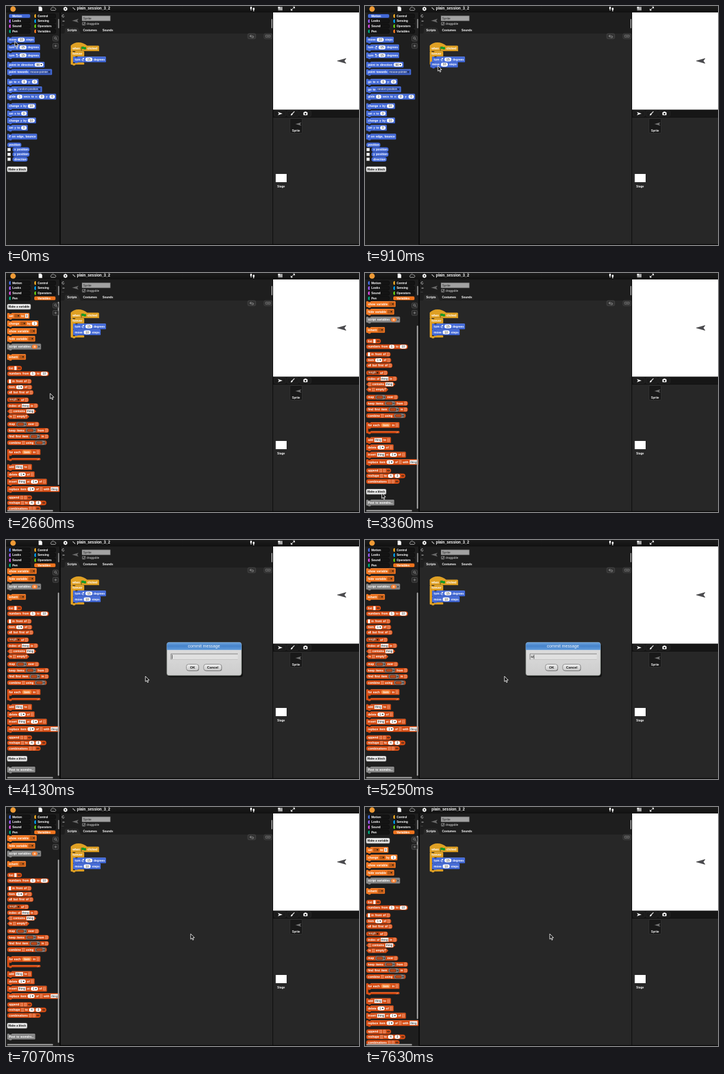
Recreate the animation shown at these times as an HTML page with a canvas. Size 600x407 px, loop 7.7 s.

```html
<!DOCTYPE html>
<html lang="en">
<head>
<meta charset="utf-8">
<title>Block editor</title>
<style>
html, body { margin: 0; width: 100%; height: 100%; overflow: hidden; background: #0a0a0a; }
canvas { display: block; width: 600px; height: 407px; }
</style>
</head>
<body>
<canvas id="stage"></canvas>
<script>
const LOOP = 7700;
const canvas = document.getElementById('stage');
const g = canvas.getContext('2d');
const ratio = window.devicePixelRatio || 1;
canvas.width = 600 * ratio;
canvas.height = 407 * ratio;

const BLUE = '#4369d6', GOLD = '#dfa024', ORANGE = '#ee741f', RED = '#d54d14', GRAY = '#868686';
const LABEL = 4.95;
const PROJECT = 'plain_session_3_2';

const CATEGORIES = [
  ['Motion', BLUE], ['Control', GOLD], ['Looks', '#8f56e3'], ['Sensing', '#0494dc'],
  ['Sound', '#cf4ad9'], ['Operators', '#62c213'], ['Pen', '#00a178'], ['Variables', ORANGE]
];

// Block notation: (n) oval slot, [s] text slot, {s} menu slot, |a| variable,
// # list, @ ring, ~ arrows, > arrow, % and & turn icons, $ flag; trailing "v" adds a menu mark.
const MOTION = [
  ['cmd', 57.5, 'move (10) steps'], ['cmd', 70.5, 'turn % (15) degrees'], ['cmd', 84, 'turn & (15) degrees'],
  ['cmd', 100, 'point in direction (90v)'], ['cmd', 112.5, 'point towards {mouse-pointer}'],
  ['cmd', 129, 'go to x: (0) y: (0)'], ['cmd', 142, 'go to {random position}'],
  ['cmd', 154.5, 'glide (1) secs to x: (0) y: (0)'], ['cmd', 170.5, 'change x by (10)'],
  ['cmd', 183, 'set x to (0)'], ['cmd', 195, 'change y by (10)'], ['cmd', 207.5, 'set y to (0)'],
  ['cmd', 222.5, 'if on edge, bounce'], ['pill', 236.5, 'position'],
  ['check', 244.5, 'x position'], ['check', 252.7, 'y position'], ['check', 261, 'direction'],
  ['button', 278, 'Make a block', 34]
];
const VARIABLES = [
  ['button', 57.5, 'Make a variable', 40],
  ['cmd', 73, 'set {} to [0]', ORANGE], ['cmd', 86, 'change {} by (1)', ORANGE],
  ['cmd', 99, 'show variable {}', ORANGE], ['cmd', 112, 'hide variable {}', ORANGE],
  ['cmd', 125.5, 'script variables |a| >', GRAY], ['cmd', 143, 'inherit {}', ORANGE],
  ['pill', 162, 'list [] ~'], ['pill', 171.5, 'numbers from (1) to (10)'],
  ['pill', 184.5, '[] in front of #'], ['pill', 194.5, 'item (1v) of #'], ['pill', 203.5, 'all but first of #'],
  ['pill', 216, '{length} of #'], ['pill', 226, 'index of [thing] in #'],
  ['hex', 235.5, '# contains [thing]'], ['hex', 244.5, 'is # empty?'],
  ['pill', 257.5, 'map @ over #'], ['pill', 268, 'keep items @ from #'],
  ['pill', 278.5, 'find first item @ in #'], ['pill', 289, 'combine # using @'],
  ['loop', 305, 'for each |item| in #'],
  ['cmd', 330.5, 'add [thing] to #'], ['cmd', 343, 'delete (1v) of #'],
  ['cmd', 355.5, 'insert [thing] at (1v) of #'], ['cmd', 368, 'replace item (1v) of # with [thing]'],
  ['pill', 382.5, 'append # # ~'], ['pill', 391.5, 'reshape # to (4) (3) ~'], ['pill', 401, 'combinations # # ~'],
  ['button', 418.5, 'Make a block', 34], ['cmd', 437, 'Post to womdra...', GRAY]
];

const POINTER = [
  [0, 15, 60], [280, 15, 60], [980, 127, 103], [1260, 127, 103], [1820, 72, 48], [2030, 66, 42],
  [2170, 66, 42], [2660, 75, 205], [3010, 75, 205], [3430, 25, 388], [3570, 25, 388],
  [4060, 237, 232], [5950, 237, 232], [6440, 310, 215], [6790, 310, 215], [7100, 314, 216]
];
const DRAG_START = 280, DROP = 1120, SHOW_VARIABLES = 2100, ASK = 3640, CONFIRM = 6790, SAVED = 7210;

const clamp = v => Math.max(0, Math.min(1, v));
const ease = v => v * v * (3 - 2 * v);
const ramp = (t, from, to) => ease(clamp((t - from) / (to - from)));

function pointerAt(t) {
  const next = POINTER.findIndex(k => k[0] > t);
  if (next < 0) return POINTER.at(-1).slice(1);
  const [a, b] = [POINTER[next - 1], POINTER[next]];
  const k = ramp(t, a[0], b[0]);
  return [a[1] + (b[1] - a[1]) * k, a[2] + (b[2] - a[2]) * k];
}

function rect(x, y, w, h, fill) {
  g.fillStyle = fill;
  g.fillRect(x, y, w, h);
}
function round(x, y, w, h, r, fill, stroke, line = 0.6) {
  g.beginPath();
  g.roundRect(x, y, w, h, r);
  if (fill) { g.fillStyle = fill; g.fill(); }
  if (stroke) { g.strokeStyle = stroke; g.lineWidth = line; g.stroke(); }
}
function poly(points, fill, stroke, line = 0.6) {
  g.beginPath();
  points.forEach(([x, y]) => g.lineTo(x, y));
  g.closePath();
  if (fill) { g.fillStyle = fill; g.fill(); }
  if (stroke) { g.strokeStyle = stroke; g.lineWidth = line; g.stroke(); }
}
function circle(x, y, r, fill) {
  g.beginPath();
  g.arc(x, y, r, 0, 7);
  g.fillStyle = fill;
  g.fill();
}
function stroke(path, color, width) {
  g.strokeStyle = color;
  g.lineWidth = width;
  g.stroke(new Path2D(path));
}
const fill = (path, color) => { g.fillStyle = color; g.fill(new Path2D(path)); };
const setFont = (size, bold) => { g.font = `${bold ? 'bold ' : ''}${size}px "Liberation Sans", Arial, sans-serif`; };
function widthOf(str, size = LABEL, bold = true) {
  setFont(size, bold);
  return g.measureText(str).width;
}
function text(str, x, y, size = LABEL, color = '#fff', bold = true, align = 'left') {
  setFont(size, bold);
  g.textAlign = align;
  g.textBaseline = 'middle';
  g.fillStyle = color;
  g.fillText(str, x, y + 0.2);
}
function gradient(y1, y2, ...colors) {
  const grad = g.createLinearGradient(0, y1, 0, y2);
  colors.forEach((c, i) => grad.addColorStop(i / (colors.length - 1), c));
  return grad;
}
const menuMark = (x, y, color) => poly([[x, y - 1], [x + 3, y - 1], [x + 1.5, y + 1.3]], color);
const arrowRight = (x, y) => poly([[x, y - 1.7], [x + 2, y], [x, y + 1.7]], '#222');

// Draws one part of a block label and returns its width.
function part(token, x, y, paint) {
  const kind = token[0], body = token.slice(1, -1);
  if (kind === '(') {
    const menu = body.endsWith('v'), label = menu ? body.slice(0, -1) : body;
    const w = widthOf(label, LABEL, false) + 6.4 + (menu ? 3 : 0);
    if (paint) {
      round(x, y - 3.3, w, 6.6, 3.3, '#fff');
      text(label, x + 3.2, y, LABEL, '#111', false);
      if (menu) menuMark(x + w - 5, y, '#111');
    }
    return w;
  }
  if (kind === '[') {
    const w = Math.max(3.6, widthOf(body, LABEL, false) + 2.4);
    if (paint) {
      rect(x, y - 3.2, w, 6.4, '#fff');
      text(body, x + 1.2, y, LABEL, '#111', false);
    }
    return w;
  }
  if (kind === '{') {
    const label = widthOf(body, 4.7, false), w = label + (body ? 6 : 9.5);
    if (paint) {
      rect(x, y - 3.2, w, 6.4, 'rgba(0,0,0,.24)');
      text(body, x + 1, y, 4.7, '#eee', false);
      menuMark(x + w - 4.2, y, '#111');
    }
    return w;
  }
  if (kind === '|') {
    const w = widthOf(body) + 6.5;
    if (paint) {
      round(x, y - 3.5, w, 7, 3.5, '#f58a40', '#bf4c10', 0.4);
      text(body, x + 3.2, y);
    }
    return w;
  }
  if (kind === '#') {
    if (paint) {
      rect(x, y - 2.9, 4.2, 5.8, '#f3a684');
      for (let i = 0; i < 3; i++) rect(x + 0.7, y - 2.2 + i * 1.7, 2.8, 1, RED);
    }
    return 4.2;
  }
  if (kind === '@') {
    if (paint) {
      round(x, y - 3.9, 18.3, 7.8, 3.9, '#858585', '#4a2010', 0.5);
      round(x + 2.3, y - 2.6, 11, 5.2, 2.6, '#b8481a', '#3a1a0c', 0.5);
      arrowRight(x + 15, y);
    }
    return 18.3;
  }
  if (kind === '~') {
    if (paint) {
      poly([[x + 2, y - 1.7], [x, y], [x + 2, y + 1.7]], '#222');
      arrowRight(x + 3, y);
    }
    return 5;
  }
  if (token === '>') {
    if (paint) arrowRight(x, y);
    return 2;
  }
  if (kind === '%' || kind === '&') {
    if (paint) {
      const side = kind === '%' ? 1 : -1, cx = x + 2.2;
      g.beginPath();
      g.arc(cx, y + 0.5, 1.8, side > 0 ? 0.5 : 2.64, side > 0 ? 4.7 : -1.57, side < 0);
      g.strokeStyle = '#fff';
      g.lineWidth = 0.9;
      g.stroke();
      poly([[cx, y - 3], [cx + 2.4 * side, y - 1.2], [cx, y + 0.4]], '#fff');
    }
    return 4.2;
  }
  if (kind === '$') {
    if (paint) {
      rect(x, y - 3.2, 0.8, 6.6, '#224d22');
      fill(`M${x + 0.8} ${y - 3}q2 -1 4 0t3.5 0v4q-1.5 1 -3.5 0t-4 0z`, '#159a28');
    }
    return 8.5;
  }
  if (paint) text(token, x, y);
  return widthOf(token);
}

function label(spec, x, y, paint) {
  for (const token of spec.match(/\([^)]*\)|\[[^\]]*\]|\{[^}]*\}|\S+/g)) x += part(token, x, y, paint) + 2.1;
  return x;
}

function command(x, y, w, h, color) {
  fill(`M${x} ${y + 1}l1 -1h2l1 1.3h3l1 -1.3H${x + w - 1}l1 1V${y + h - 1}l-1 1H${x + 8}l-1 1.3h-3l-1 -1.3h-2l-1 -1z`, color);
  rect(x + 8, y, w - 9, 0.6, 'rgba(255,255,255,.2)');
  rect(x + 8, y + h - 0.7, w - 9, 0.7, 'rgba(0,0,0,.28)');
}

function block(kind, x, y, spec, color) {
  const inset = kind === 'hex' ? 4 : 3;
  const w = label(spec, x + inset, y, false) - x + (kind === 'hex' ? 1.5 : 0);
  if (kind === 'cmd') command(x, y - 5, w, 10, color);
  if (kind === 'pill') round(x, y - 4.1, w, 8.2, 4, color, 'rgba(0,0,0,.25)', 0.4);
  if (kind === 'hex') poly([[x, y], [x + 4, y - 4.1], [x + w - 4, y - 4.1], [x + w, y], [x + w - 4, y + 4.1], [x + 4, y + 4.1]], color);
  if (kind === 'loop') {
    command(x, y - 5, w, 10, color);
    rect(x, y + 2, 3.5, 11, color);
    command(x, y + 10, w, 4, color);
    stroke(`M${w - 4} ${y + 13}h3v-2`, '#f6a27c', 0.7);
  }
  label(spec, x + inset, y, true);
}

function paletteItem([kind, y, spec, extra], color) {
  if (kind === 'button') {
    round(2, y - 4.6, extra, 9.2, 2, gradient(y - 5, y + 5, '#fff', '#d8d8d8'), '#777');
    text(spec, 2 + extra / 2, y, 4.8, '#111', true, 'center');
  } else if (kind === 'check') {
    rect(2.5, y - 2.7, 5.4, 5.4, '#d8d8d8');
    rect(3.3, y - 1.9, 3.8, 3.8, '#f6f6f6');
    block('pill', 11, y, spec, color);
  } else {
    block(kind, 2, y, spec, extra || color);
  }
}

function sideButton(x, y) {
  round(x, y, 9.5, 8.8, 2, '#2c2c2c', '#505050', 0.8);
}

function palette(variables, scroll) {
  rect(0, 48, 91, 359, '#1e1e1e');
  g.save();
  g.beginPath();
  g.rect(0, 48, 91, 359);
  g.clip();
  g.translate(0, -scroll);
  (variables ? VARIABLES : MOTION).forEach(item => paletteItem(item, variables ? RED : BLUE));
  g.restore();
  if (variables) {
    round(88, 49 + scroll * 0.88, 2.4, 312, 1.2, '#9a9a9a');
    round(2, 403.6, 78, 2.4, 1.2, '#9a9a9a');
  }
  sideButton(79.5, 51);
  sideButton(79.5, 63.5);
  g.beginPath();
  g.arc(84, 54.7, 1.7, 0, 7);
  g.strokeStyle = '#999';
  g.lineWidth = 0.8;
  g.stroke();
  stroke('M85.2 56l2 2M82.2 67.9h4.2M84.3 65.8v4.2', '#999', 0.8);
}

function categories(selected) {
  rect(0, 11, 91, 37, '#1e1e1e');
  CATEGORIES.forEach(([name, color], i) => {
    const x = i % 2 ? 48 : 5, y = 17 + Math.floor(i / 2) * 8.7;
    round(x, y - 3.5, 36.5, 7, 2.5, name === selected ? color : '#141414', '#050505', 0.5);
    round(x, y - 3.2, 3, 6.4, [2.5, 0, 0, 2.5], color);
    text(name, x + 5.7, y, 5);
  });
  round(88.6, 22, 1.8, 16, 0.9, '#999');
}

function spriteArrow(x, y, w, color, edge) {
  const h = w * 0.28;
  poly([[x, y], [x + w, y - h], [x + w * 0.8, y], [x + w, y + h]], color, edge, 0.5);
}

function topBar(unsaved) {
  rect(0, 0, 600, 11, gradient(0, 11, '#1c1c1c', '#111'));
  circle(12, 5.2, 4.6, '#ee9a35');
  fill('M55.5 1h4l2 2v5.5h-6z', '#fff');
  const cloud = 'M77 7.5a2 2 0 0 1 0 -3.5a3 3 0 0 1 5.5 -.7a2.2 2.2 0 0 1 1 4.2z';
  fill(cloud, '#222');
  stroke(cloud, '#ddd', 0.7);
  for (let i = 0; i < 8; i++) {
    const a = i * Math.PI / 4;
    circle(101 + 2.7 * Math.cos(a), 4.9 + 2.7 * Math.sin(a), 0.9, '#fff');
  }
  circle(101, 4.9, 2.6, '#fff');
  circle(101, 4.9, 1.1, '#161616');
  if (unsaved) stroke('M114 2.8l3.5 3.7M113.6 2.3l.4 1.4', '#ccc', 1.1);
  text(PROJECT, unsaved ? 120.5 : 113, 4.2, 6.4);
  [[416.5, 3.3], [421, 5]].forEach(([x, y]) => {
    g.beginPath();
    g.ellipse(x, y, 1.5, 2.2, 0.1, 0, 7);
    g.fillStyle = '#fff';
    g.fill();
    circle(x, y + 3.2, 0.9, '#fff');
  });
  rect(462.5, 1.5, 7.5, 6, '#aaa');
  rect(462.5, 1.5, 3, 2.5, '#fff');
  stroke('M485 7l5 -5', '#eee', 1);
  poly([[487.5, 1.2], [491, 1.2], [491, 4.7]], '#fff');
  poly([[484, 4.3], [484, 7.8], [487.5, 7.8]], '#fff');
}

function spriteBar() {
  rect(93, 11, 360, 36, '#1e1e1e');
  stroke('M98.4 15.5a1.9 1.9 0 1 0 .6 2M96 25.8h3.5', '#ddd', 0.9);
  rect(94.5, 32, 4, 0.7, '#555');
  spriteArrow(111, 25, 13, '#6a6a6a', '#111');
  rect(129, 16.5, 48.5, 9, '#858585');
  rect(129.8, 17.3, 46.9, 7.4, '#a2a2a2');
  text('Sprite', 131, 21, 5.4, '#222', false);
  rect(130, 28, 4.4, 4.4, '#111');
  stroke('M130 28h4.4v4.4h-4.4zM130.8 30l1.2 1.5l2.8 -3.8', '#ddd', 0.6);
  text('draggable', 137, 30.2, 4.8, '#ddd', false);
  fill('M97 47q3 0 3 -4v-3q0 -3 3 -3h17q3 0 4 3l3 7z', '#292929');
  text('Scripts', 104, 41.5, 4.9);
  text('Costumes', 131, 41.5, 4.9);
  text('Sounds', 164, 41.5, 4.9);
  round(451, 22, 1.8, 16, 0.9, '#999');
}

function scripts(t) {
  rect(93, 47, 360, 358.5, '#272727');
  if (t < SAVED) {
    round(411, 47, 13.3, 8.8, 2, '#333', '#555');
    stroke('M414.5 51.2h5a1.3 1.3 0 0 1 0 2.6h-2M416.7 49.2l-2.2 2l2.2 2', '#a0a0a0', 0.9);
  }
  round(438.7, 47, 13.3, 8.8, 2, '#2c2c2c', '#555');
  stroke('M441.3 49.5h8v3.7h-8zM443 51.4h5', '#8a8a8a', 0.8);

  const dropped = t >= DROP, inner = dropped ? 20.5 : 10.5;
  fill('M110 67.5C116 60 130 60 138 67.5H157l1.2 1V77H110z', GOLD);
  rect(113, 76.3, 44, 0.7, 'rgba(0,0,0,.28)');
  label('when $ clicked', 113, 72.5, true);
  command(110, 77, 23, 9, GOLD);
  rect(110, 80, 4, inner + 8, GOLD);
  command(110, 85.7 + inner, 23, 3.8, GOLD);
  text('forever', 113, 81.7);
  block('cmd', 114, 91, 'turn % (15) degrees', BLUE);
  if (dropped) block('cmd', 114, 101, 'move (10) steps', BLUE);
}

function stageAndCorral() {
  rect(454, 11, 146, 165.5, '#fff');
  spriteArrow(563, 93.5, 15, '#4c4c50', '#222');
  rect(454, 177, 146, 12.5, '#161616');
  [456, 477.5, 499].forEach(x => round(x, 178.5, 19.5, 9.5, 2, '#1b1b1b', '#303030', 0.6));
  poly([[462, 180.5], [470, 183.3], [462, 186], [464, 183.3]], '#fff');
  stroke('M486.5 183.5l3.8 -3.8', '#fff', 1.2);
  fill('M484 186.5q0 -3 2 -3.7l1.5 1.5q-.7 2 -3.5 2.2z', '#fff');
  round(505.5, 180.8, 7, 5.2, 1, '#fff');
  rect(507.5, 179.8, 3, 1.5, '#fff');
  circle(509, 183.4, 1.5, '#1b1b1b');

  rect(454, 190, 146, 215.5, '#272727');
  round(482.5, 191.5, 21, 25, 2, '#191919', '#3e3e3e', 0.6);
  spriteArrow(491, 201, 11.5, '#777', '#111');
  text('Sprite', 493, 213, 4.7, '#fff', true, 'center');
  rect(458.5, 286, 18.5, 14, '#fff');
  text('Stage', 467.5, 307.8, 4.7, '#fff', true, 'center');
}

function dialogButton(name, x, w) {
  round(x + 0.6, 212.2, w, 11, 4, 'rgba(0,0,0,.45)');
  round(x, 211.5, w, 11, 4, gradient(211, 223, '#f2f2f2', '#c6c6c6'), '#777', 0.8);
  text(name, x + w / 2, 217, 5.8, '#111', true, 'center');
}

function dialog(t) {
  const typed = 'Move'.slice(0, t < 5180 ? 0 : 1 + Math.floor((t - 5180) / 140));
  round(275.5, 177, 127, 56.5, 4, 'rgba(0,0,0,.6)');
  round(273.3, 174.3, 127, 56.5, 4, gradient(187, 231, '#dcdcdc', '#cccccc'), '#858c85', 0.9);
  round(273.3, 174.3, 127, 13, [4, 4, 0, 0], gradient(174, 187, '#6ea3dc', '#4784cc', '#5f9ada'));
  text('commit message', 336.5, 180.6, 7.2, '#fff', false, 'center');
  rect(280, 193.5, 114, 10, '#7d7d7d');
  rect(281, 194.5, 113, 9, '#e0e0e0');
  text(typed, 282, 199, 5.5, '#111', false);
  rect(282.2 + widthOf(typed, 5.5, false), 195.5, 0.7, 7, '#111');
  dialogButton('OK', 306.5, 21);
  dialogButton('Cancel', 336, 30.5);
}

function pointer(x, y) {
  const tip = [[0, 0], [0, 9.2], [2.1, 7.3], [3.5, 10.6], [5, 10], [3.6, 6.8], [6.4, 6.6]];
  poly(tip.map(([dx, dy]) => [x + dx, y + dy]), '#111', '#fff', 0.9);
}

function draw(t) {
  g.setTransform(ratio, 0, 0, ratio, 0, 0);
  rect(0, 0, 600, 407, '#0a0a0a');
  const variables = t >= SHOW_VARIABLES;
  const [x, y] = pointerAt(t);
  topBar(t < SAVED);
  spriteBar();
  scripts(t);
  stageAndCorral();
  palette(variables, t < SAVED ? 46 * ramp(t, 2700, 2980) : 0);
  categories(variables ? 'Variables' : 'Motion');
  if (t >= DRAG_START && t < DROP) block('cmd', x - 13, y - 2, 'move (10) steps', BLUE);
  if (t >= ASK && t < CONFIRM) dialog(t);
  pointer(x, y);
}

const start = performance.now();
function tick() {
  draw((performance.now() - start) % LOOP);
  requestAnimationFrame(tick);
}
tick();
</script>
</body>
</html>
```
